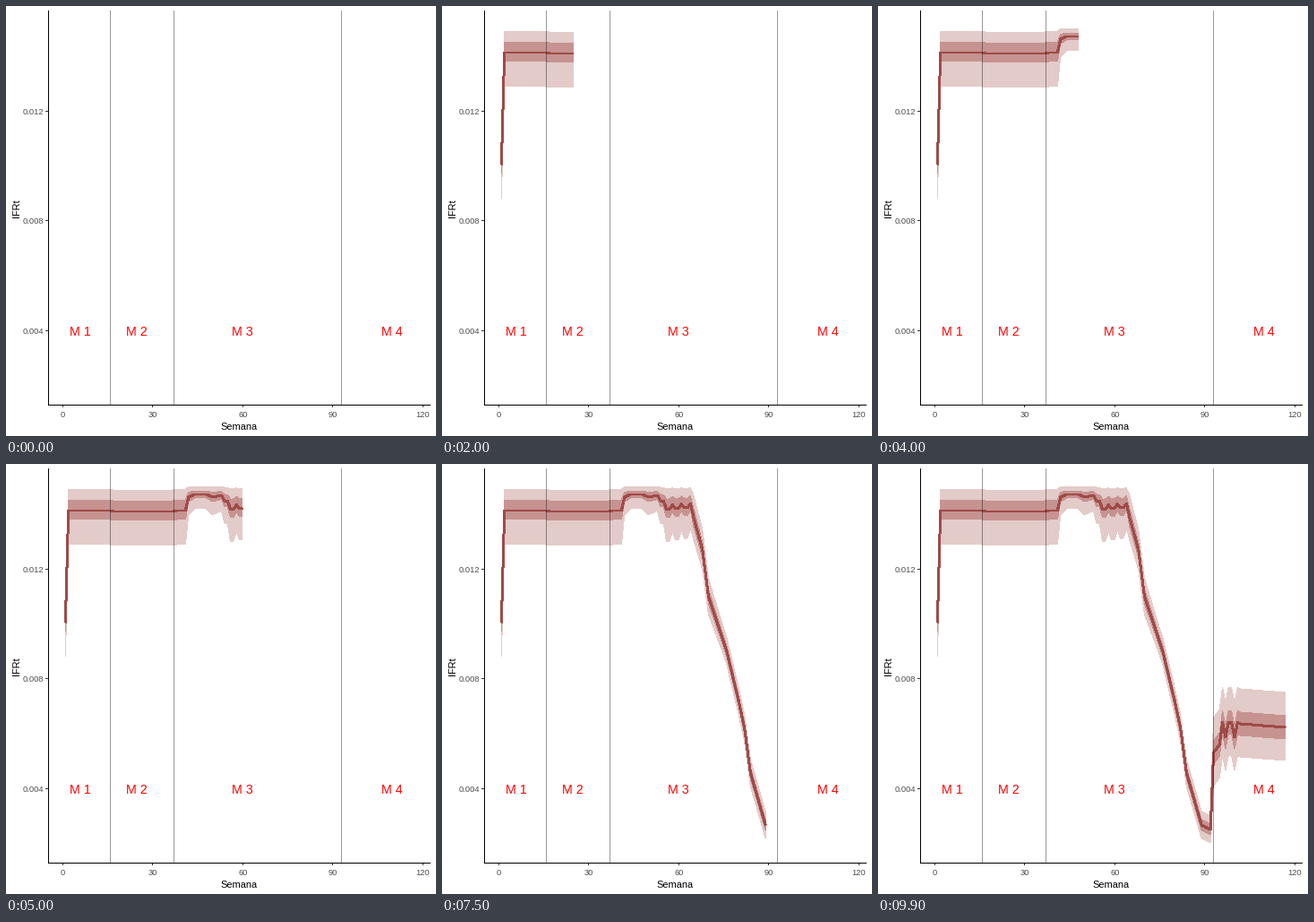
Animation, 480 px wide and 480 px high, one loop 10000 ms. Source, as a matplotlib script:

```python
import numpy as np
import matplotlib.pyplot as plt
from matplotlib.animation import FuncAnimation
from matplotlib.patches import Polygon

SIZE, DPI = 480, 72  # at 72 dpi one point is one pixel
FRAMES, WEEKS = 100, 117
LINE, INNER, OUTER = "#a04a47", "#c69391", "#e3cbc9"

plt.rcParams["font.family"] = ["Liberation Sans", "DejaVu Sans"]

week = np.arange(1, WEEKS + 1)
x = 63 + 3.35 * week
reveal = np.round((week - 1) * (FRAMES - 1) / (WEEKS - 1))

# Median: straight runs between key weeks, plus a three-week ripple
keys = [(1, 177), (2, 52), (16, 52), (17, 53), (37, 53), (38, 52), (41, 52),
        (42, 37), (44, 34), (48, 34), (50, 37), (53, 35), (56, 49), (64, 47),
        (68, 96), (70, 148), (76, 208), (80, 264), (82, 295), (84, 345),
        (89, 403), (92, 408), (93, 322), (95, 313), (96, 294), (101, 294),
        (102, 290), (117, 294)]
ripple = np.select([(week >= 54) & (week <= 64), (week >= 96) & (week <= 101)],
                   [-3, 11], 0)
median = (np.interp(week, *zip(*keys))
          + ripple * np.cos(2 * np.pi * (week - 1) / 3))

# Bands: tight near the ceiling, narrowing on the fall, wide at the end
slack = np.clip((median - 34) / 18, 0, 1)
fall = np.interp(week, [65, 75], [10, 6])


def reach(early, falling, late):
    return np.select([week < 65, week < 93], [early, falling], late)


in_up = reach(4 + 8 * slack, fall, 13)
in_down = reach(4 + 6 * slack, fall, 13)
out_up = reach(9 + 15 * slack, 2.5 * fall, 39)
out_down = reach(16 + 22 * slack, 2.5 * fall, 37)

fig = plt.figure(figsize=(SIZE / DPI, SIZE / DPI), dpi=DPI, facecolor="white")
ax = fig.add_axes([0, 0, 1, 1])
ax.set(xlim=(0, SIZE), ylim=(SIZE, 0))
ax.axis("off")


def bar(px, py, w, h, color, z=5, alpha=1):
    ax.add_patch(plt.Rectangle((px, py), w, h, fc=color, lw=0, alpha=alpha,
                               zorder=z, antialiased=False))


def label(px, py, text, size, color, ha="center", **kw):
    ax.text(px, py, text, fontsize=size, color=color, ha=ha,
            va="baseline", zorder=6, **kw)


def band(color, z):
    return ax.add_patch(Polygon(np.zeros((3, 2)), fc=color, lw=0, zorder=z,
                                antialiased=False))


def outline(n, up, down):
    top = np.column_stack([x, median - up])[:n]
    low = np.column_stack([x, median + down])[:n]
    return np.vstack([top, low[::-1]])


# Axes
bar(47, 5, 1, 441, "black")
bar(47, 445, 427, 1, "black")
for value in range(0, 121, 30):
    px = round(62.8 + 3.35 * value)
    bar(px, 446, 1, 2, "#333333")
    label(px + 0.5, 459, str(value), 9.2, "#4d4d4d")
for value in (0.004, 0.008, 0.012):
    py = int(484.6 - value * 30625)
    bar(44, py, 3, 1, "#333333")
    label(42, py + 4, f"{value:.3f}", 9.2, "#4d4d4d", ha="right")
label(260, 473, "Semana", 11, "black")
label(15, 226, "IFRt", 11, "black", rotation=90, rotation_mode="anchor")

# Period marks
for w in (16, 37, 93):
    bar(round(62.8 + 3.35 * w), 5, 1, 440, "black", z=4, alpha=0.4)
for i, px in enumerate((82.5, 145.5, 263.5, 430.5), 1):
    label(px, 368, f"M {i}", 14.2, "red")

outer = band(OUTER, 1)
inner = band(INNER, 2)
curve, = ax.plot([], [], color=LINE, lw=2, zorder=3, solid_capstyle="butt",
                 antialiased=False)


def draw(k):
    n = np.count_nonzero(reveal <= k)
    outer.set_xy(outline(n, out_up, out_down))
    inner.set_xy(outline(n, in_up, in_down))
    curve.set_data(x[:n], median[:n])
    return outer, inner, curve


anim = FuncAnimation(fig, draw, frames=FRAMES, interval=100, repeat=True,
                     repeat_delay=0, blit=False)
plt.show()
```
